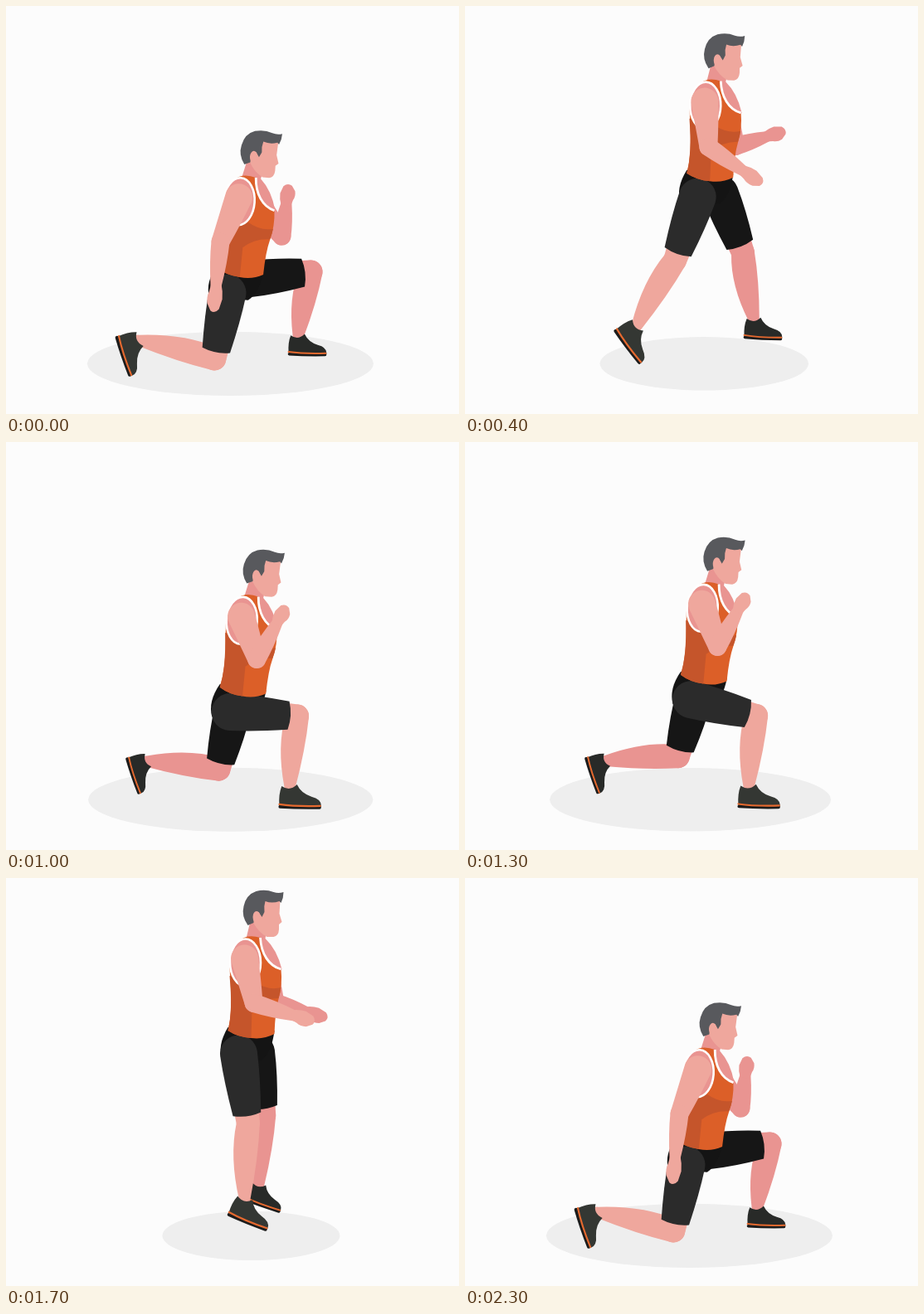
These frames come from a looping animation (546x492 px, 2400 ms). An HTML page with a canvas:

```html
<!DOCTYPE html>
<html lang="en">
<head>
<meta charset="utf-8">
<title>Jumping lunges</title>
<style>
  html, body { margin: 0; width: 100%; height: 100%; overflow: hidden; background: #fcfcfc; }
  canvas { display: block; }
</style>
</head>
<body>
<canvas id="stage" width="546" height="492"></canvas>
<script>
const ctx = document.getElementById('stage').getContext('2d');
const LOOP = 2400, HALF = 1200, STEP = 100;
const SKIN = '#efa79d', DEEP = '#e99491', SHIRT = '#dc5f28', SHADE = '#c5552b';

const NEAR = {
  skin: SKIN, shoe: '#343733', cloth: '#2b2b2b', hipWidth: 22.5, size: 0.97,
  thigh: 81, shin: 87, upper: 55, fore: 51, shoulder: [-8, -93],
  foot: [0, 0], wrist: 0
};
const FAR = {
  skin: DEEP, shoe: '#282a28', cloth: '#161616', hipWidth: 22, size: 0.88,
  thigh: 73, shin: 80, upper: 49, fore: 40, shoulder: [14, -86],
  foot: [10, -18], wrist: 14
};

const shapes = {
  neck: 'M294 52 L289 73 L300 84 L328 112 L332 110 Q326 86 312 73 L314 62 Z',
  face: 'M300 30 L312 25 L330 27 L329 43 L332 53 L328.500 56 L328.500 62 Q328 70 322 71 L314 71 Q304 66 297 53 Z',
  hair: 'M291 57 Q283 46 286 34 Q289 20 301 16 Q312 13 322 17 Q328 19 334 17 Q334 24 331 30 L329 28 Q320 31 312 28 Q310 34 311 41 L308 47 L304 41 L298 44 L298 54 Z',
  shirt: 'M280 76 Q290 67 306 72 C307 91 316 106 331 110 Q333 128 328 146 Q324 160 323 188 Q310 195 295 193 Q279 192 267 184 Q273 160 270 125 L269 108 Q270 85 280 76 Z',
  shade: 'M269 118 L300 126 Q316 136 331 132 Q330 139 328 145 Q310 145 296 157 L295 193 Q279 192 267 184 Q273 160 269 118 Z',
  collar: 'M306 72 C307 91 316 106 331 110',
  pelvis: 'M267 180 C258 195 256 208 260 220 L307 220 Q320 210 323 184 Z',
  shoe: 'M-10 -2 Q0 5 9 -4 Q14 7 27 11 Q39 14 39 22 L39 24 L-13 22 Q-14 8 -10 -2 Z',
  sole: 'M-12 23.500 Q10 25 37 24.500',
  stripe: 'M-13 20.500 Q8 23.500 38 22.500',
  hand: 'M-3 -6.500 Q4 -10 11 -10 L20 -7 Q25 -2 22 4 L16 9 Q10 11 5 8 L-3 6 Z'
};
for (const k in shapes) shapes[k] = new Path2D(shapes[k]);

const clamp = v => Math.max(0, Math.min(1, v));
const mix = (a, b, s) => a + (b - a) * s;
const aim = (a, b) => Math.atan2(b[1] - a[1], b[0] - a[0]);
function smooth(from, to, t) {
  const s = clamp((t - from) / (to - from));
  return s * s * (3 - 2 * s);
}

// Height of the jump, 0 in the lunge and 1 at the peak.
function liftAt(h, fall) {
  const s = clamp(h / 500);
  return h < 500 ? s * (1.4 - 0.4 * s) : clamp((1100 - h) / 600) ** fall;
}

// Middle joint of a two-part limb; side picks the direction of the bend.
function bend(a, b, first, second, side) {
  const dist = Math.hypot(b[0] - a[0], b[1] - a[1]);
  const stretch = Math.max(1, dist / (first + second));
  const p = first * stretch, q = second * stretch;
  const along = (p * p - q * q + dist * dist) / (2 * dist);
  const out = side * Math.sqrt(Math.max(64, p * p - along * along));
  const c = (b[0] - a[0]) / dist, s = (b[1] - a[1]) / dist;
  return [a[0] + c * along + s * out, a[1] + s * along - c * out];
}

function fill(path, color) {
  ctx.fillStyle = color;
  ctx.fill(path);
}

function line(path, color, width) {
  ctx.strokeStyle = color;
  ctx.lineWidth = width;
  ctx.stroke(path);
}

function oval(x, y, rx, ry) {
  const path = new Path2D();
  path.ellipse(x, y, rx, ry, 0, 0, Math.PI * 2);
  return path;
}

function at([x, y], angle, paint) {
  ctx.save();
  ctx.translate(x, y);
  ctx.rotate(angle);
  paint();
  ctx.restore();
}

// Tapered segment from a to b; front and back set the bulge of its two sides.
function limb(a, b, ra, rb, front, back, color, cut) {
  const len = Math.hypot(b[0] - a[0], b[1] - a[1]);
  at(a, aim(a, b), () => {
    ctx.beginPath();
    ctx.arc(0, 0, ra, Math.PI / 2, Math.PI * 1.5);
    ctx.quadraticCurveTo(len * 0.45, -front, len, -rb);
    if (cut) ctx.quadraticCurveTo(len + 5, 0, len, rb);
    else ctx.arc(len, 0, rb, -Math.PI / 2, Math.PI / 2);
    ctx.quadraticCurveTo(len * 0.45, back, 0, ra);
    ctx.fillStyle = color;
    ctx.fill();
  });
}

// rear is 1 for the back leg of a lunge and 0 for the front leg.
function leg(side, hip, rear, lift) {
  const ankle = [
    mix(342, 159, rear) + side.foot[0],
    mix(417, 403, rear) + side.foot[1] - 32 * Math.max(0, lift - 0.25)
  ];
  const knee = bend(hip, ankle, side.thigh, side.shin + 8 * rear, 1);
  const hem = hip.map((v, i) => mix(v, knee[i], 0.87));
  limb(hip, knee, 18, 14, 17, 17, side.skin);
  limb(knee, ankle, 14, 6.5, 14, 21, side.skin);
  at(ankle, rear * 70 * Math.PI / 180, () => {
    ctx.scale(side.size, side.size);
    ctx.lineCap = 'round';
    fill(shapes.shoe, side.shoe);
    line(shapes.sole, '#1c1c1c', 4);
    line(shapes.stripe, '#e5692f', 2.2);
  });
  limb(hip, hem, side.hipWidth, 17, 22, 22, side.cloth, true);
}

// The wrist swings along a curve from beside the hip to under the chin.
function arm(side, waist, shoulder, raise) {
  const low = 1 - raise;
  const curve = (a, b, c) => low * low * a + 2 * low * raise * b + raise * raise * c;
  const wrist = [
    waist[0] + side.wrist + curve(-29, 90, 42),
    waist[1] + curve(14, 0, -86)
  ];
  const elbow = bend(shoulder, wrist, side.upper, side.fore, -1);
  const dir = aim(elbow, wrist);
  limb(shoulder, elbow, 16.5, 11, 15, 14, side.skin);
  limb(elbow, wrist, 11, 6.5, 11, 11, side.skin);
  at(wrist, dir, () => {
    ctx.scale(1 + 0.35 * Math.max(0, Math.sin(dir)), 0.92);
    fill(shapes.hand, side.skin);
  });
}

function torso() {
  const armhole = oval(288, 102, 18.5, 28.5);
  fill(shapes.neck, DEEP);
  fill(shapes.shirt, SHIRT);
  fill(shapes.shade, SHADE);
  ctx.lineCap = 'butt';
  line(shapes.collar, '#fff', 2.8);
  fill(armhole, DEEP);
  line(armhole, '#fff', 2.6);
  fill(shapes.face, SKIN);
  fill(shapes.hair, '#58595d');
  fill(oval(301.5, 47, 4.5, 7), SKIN);
}

function draw(t) {
  const h = t % HALF, first = t < HALF;
  const lift = liftAt(h, first ? 1.05 : 1.37);
  const waist = [282 + 13.5 * Math.sin(lift * Math.PI / 2), 324 - 134 * lift];
  const lean = 4 * (1 - lift * lift) * Math.PI / 180;

  // One side steps forward while the other steps back.
  const forward = { rear: 1 - smooth(300, 600, h), raise: smooth(50, 850, h) };
  const backward = { rear: smooth(370, 730, h), raise: 1 - smooth(200, 850, h) };
  const [near, far] = first ? [forward, backward] : [backward, forward];

  const local = ([x, y]) => [
    waist[0] + x * Math.cos(lean) - y * Math.sin(lean),
    waist[1] + x * Math.sin(lean) + y * Math.cos(lean)
  ];
  // Body shapes are drawn around a waist at 295, 190.
  const body = paint => at(waist, lean, () => {
    ctx.translate(-295, -190);
    paint();
  });

  ctx.fillStyle = '#fcfcfc';
  ctx.fillRect(0, 0, 546, 492);
  const rx = 172.5 - 65.5 * lift ** 2.3;
  fill(oval(336.3 - 0.382 * rx, 431.3, rx, 15 + 0.137 * rx), '#eeeeee');

  const nearHip = [waist[0] - 15, waist[1] + 22];
  const farHip = [
    waist[0] + mix(13, -12, far.rear),
    waist[1] + 20 - 15 * (1 - far.rear) * (1 - lift)
  ];
  arm(FAR, waist, local(FAR.shoulder), far.raise);
  leg(FAR, farHip, far.rear, lift);
  body(() => fill(shapes.pelvis, '#141414'));
  leg(NEAR, nearHip, near.rear, lift);
  body(torso);
  arm(NEAR, waist, local(NEAR.shoulder), near.raise);
}

const start = performance.now();
function tick() {
  const t = (performance.now() - start) % LOOP;
  draw(Math.floor(t / STEP) * STEP);
  requestAnimationFrame(tick);
}
tick();
</script>
</body>
</html>
```
